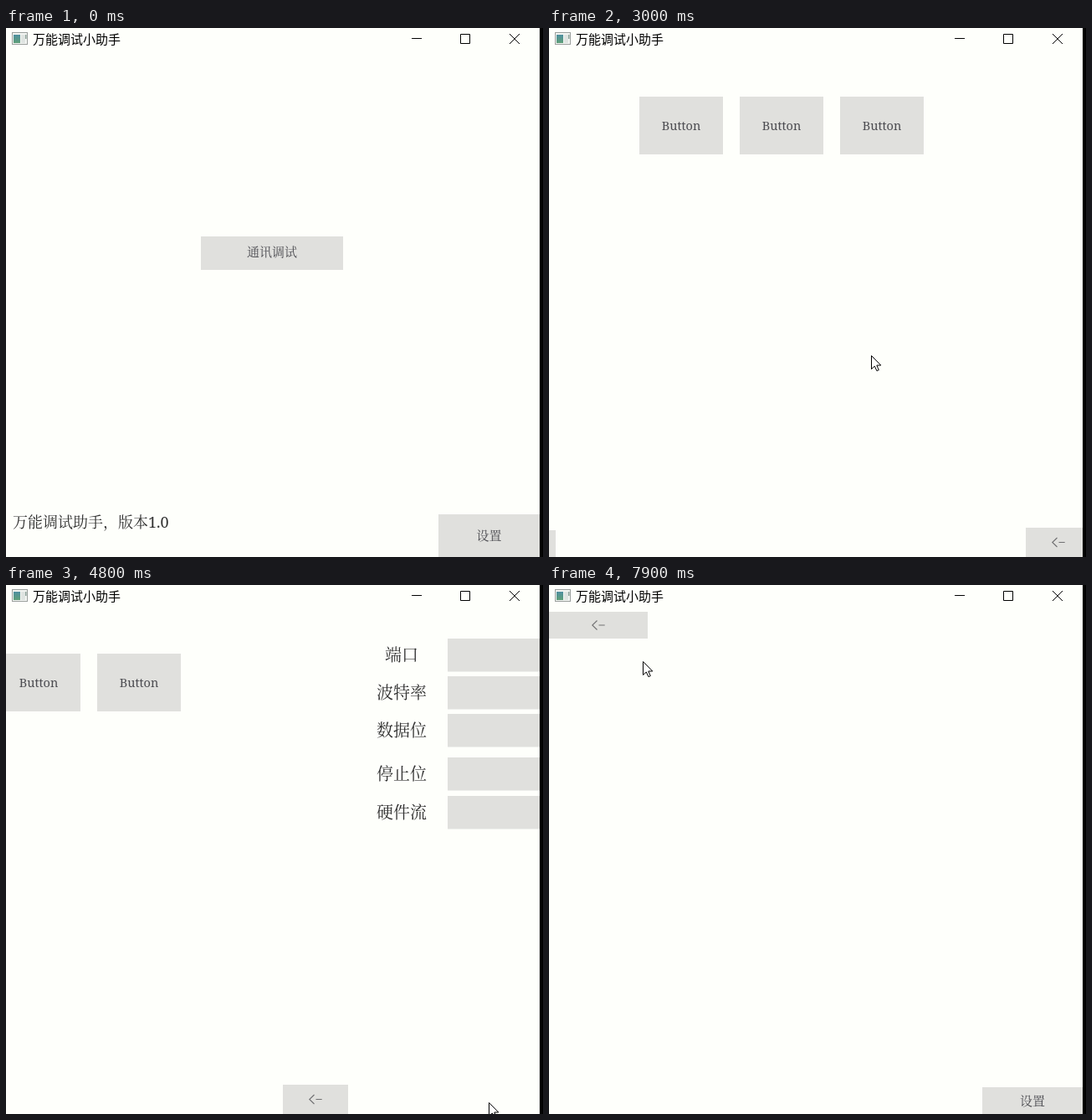
These frames come from a looping animation (642x632 px, 8000 ms). An HTML page:

```html
<!DOCTYPE html>
<html lang="zh-CN">
<head>
<meta charset="utf-8">
<style>
html, body { margin: 0; width: 100%; height: 100%; overflow: hidden; background: #fefffb; }
svg { display: block; }
text { font-family: "Noto Serif", "Noto Serif CJK SC", "Noto Sans CJK SC", "Noto Sans CJK", serif; font-weight: 300; text-anchor: middle; }
.title { font-family: "Noto Sans CJK SC", "Noto Sans CJK", sans-serif; font-weight: 400; }
</style>
</head>
<body>
<svg id="stage" width="642" height="632" viewBox="0 0 642 632">
  <defs>
    <clipPath id="view"><rect y="28" width="638" height="604"/></clipPath>
    <linearGradient id="teal" x2="0" y2="1">
      <stop offset="0" stop-color="#4f8fa0"/><stop offset="1" stop-color="#5f9f78"/>
    </linearGradient>
  </defs>
  <rect width="642" height="632" fill="#fefffb"/>
  <g clip-path="url(#view)">
    <g id="home"></g><g id="comm"></g><g id="panel"></g><g id="serial"></g>
  </g>
  <rect x="7.5" y="5.5" width="18" height="14" fill="#f3f5f2" stroke="#9a9f9c"/>
  <rect x="9" y="8" width="8" height="10" fill="url(#teal)"/>
  <rect x="18" y="8" width="5" height="10" fill="#dfe4e1"/>
  <rect x="23" y="8" width="1.5" height="5" fill="#8fa59b"/>
  <text class="title" x="84.5" y="19" font-size="15" fill="#000">万能调试小助手</text>
  <path d="M485 12.5H497M543.5 7.5H554.5V18.5H543.5ZM602 7L614 19M614 7L602 19" fill="none" stroke="#000"/>
  <rect x="638" width="4" height="632" fill="#000"/>
  <path id="cursor" d="M.5 .5V16.5L4.3 13L6.9 18.6L9.3 17.6L6.8 12H11.8Z" fill="#fff" stroke="#000"/>
</svg>
<script>
const $ = id => document.getElementById(id);
const W = 640, LOOP = 8000, STEP = 100, SLIDE = 400;
const FACE = '#e0e0dd', INK = '#4b4b50', DARK = '#303030';

const box = (x, y, w, h) => `<rect x="${x}" y="${y}" width="${w}" height="${h}" fill="${FACE}"/>`;
// label centred on (x, y)
const label = (x, y, size, s, fill = INK) =>
  `<text x="${x}" y="${y + size * 0.37}" font-size="${size}" fill="${fill}">${s}</text>`;
const button = (x, y, w, h, s, size = 15, rise = 0) =>
  box(x, y, w, h) + label(x + w / 2, y + h / 2 - rise, size, s);
const line = (d, stroke, w) => `<path d="${d}" fill="none" stroke="${stroke}" stroke-width="${w}"/>`;
const back = (x, y, w, h, k = 1, ink = '#707072') => box(x, y, w, h) +
  line(`M${x + w / 2 - 1.5 * k} ${y + h / 2 - 5.5 * k}l${-5.7 * k} ${5.5 * k}l${5.7 * k} ${5.5 * k}` +
    `M${x + w / 2 + k / 2} ${y + h / 2}h${7.2 * k}`, ink, 1.1);

$('home').innerHTML =
  button(233, 249, 170, 40, '通讯调试', 15, 1.5) +
  button(517, 581, 121, 51, '设置') +
  `<text x="8" y="596.5" font-size="18" fill="${DARK}" style="text-anchor:start">万能调试助手，版本1.0</text>`;

$('comm').innerHTML = back(0, 32, 118, 32) + button(518, 600, 120, 32, '设置');

$('panel').innerHTML =
  [0, 1, 2].map(i => button(98 + 120 * i, 82, 100, 69, 'Button', 14.5)).join('') +
  back(560, 597, 78, 35);

// combo rows, the last two set apart
const combo = (name, i) => {
  const y = 64 + Math.floor(45.3 * i) + (i > 2 ? 7 : 0), c = y + 20;
  return label(62, c - 0.5, 20, name, DARK) + box(117, y, 257, 39.5) +
    line(`M347.8 ${c - 4}l5.7 -5.5l5.7 5.5M347.8 ${c + 3.5}l5.7 5.5l5.7 -5.5`, '#353637', 2.3);
};
$('serial').innerHTML =
  ['端口', '波特率', '数据位', '停止位', '硬件流'].map(combo).join('') +
  `<circle cx="467.5" cy="274" r="20" fill="${FACE}"/>` + line('M464 274h7M467.5 270v8', '#77777a', 1) +
  back(542, 591, 98, 41, 2.2, '#3c3c3e');

// start time, leaving page, entering page, direction (1 push, -1 pop)
const slides = [
  [760, 'home', 'comm', 1],
  [2700, 'comm', 'panel', 1],
  [3468, 'panel', 'serial', 1],
  [4684, 'serial', 'panel', -1],
  [7050, 'panel', 'comm', -1]
];

// pointer stops: time, x, y
const stops = [
  [0, 650, 440], [600, 340, 272], [1100, 340, 272], [2100, 526, 550], [2600, 578, 609],
  [3000, 385, 391], [3400, 288, 130], [3700, 309, 205], [4600, 577, 618], [4800, 577, 618],
  [5600, 582, 609], [6000, 330, 140], [6400, 310, 120], [6900, 548, 563], [7100, 567, 599],
  [7900, 112, 91]
];

function place(id, x) {
  const g = $(id);
  g.setAttribute('transform', `translate(${Math.round(x)} 0)`);
  g.setAttribute('visibility', Math.abs(x) < W ? 'visible' : 'hidden');
}

function draw(t) {
  const at = { home: 0, comm: W, panel: W, serial: W };
  for (const [start, from, to, dir] of slides) {
    if (t < start) break;
    const left = (1 - Math.min(1, (t - start) / SLIDE)) ** 3;
    at[from] = -dir * W * (1 - left);
    at[to] = dir * W * left;
  }
  for (const id in at) place(id, at[id]);

  const i = Math.max(1, stops.findIndex(s => s[0] >= t));
  const [t0, x0, y0] = stops[i - 1], [t1, x1, y1] = stops[i];
  const k = (t - t0) / (t1 - t0);
  const x = Math.round(x0 + (x1 - x0) * k), y = Math.round(y0 + (y1 - y0) * k);
  $('cursor').setAttribute('transform', `translate(${x} ${y})`);
}

const begin = performance.now();
function tick() {
  const t = (performance.now() - begin) % LOOP;
  draw(Math.floor(t / STEP) * STEP);
  requestAnimationFrame(tick);
}
tick();
</script>
</body>
</html>
```
